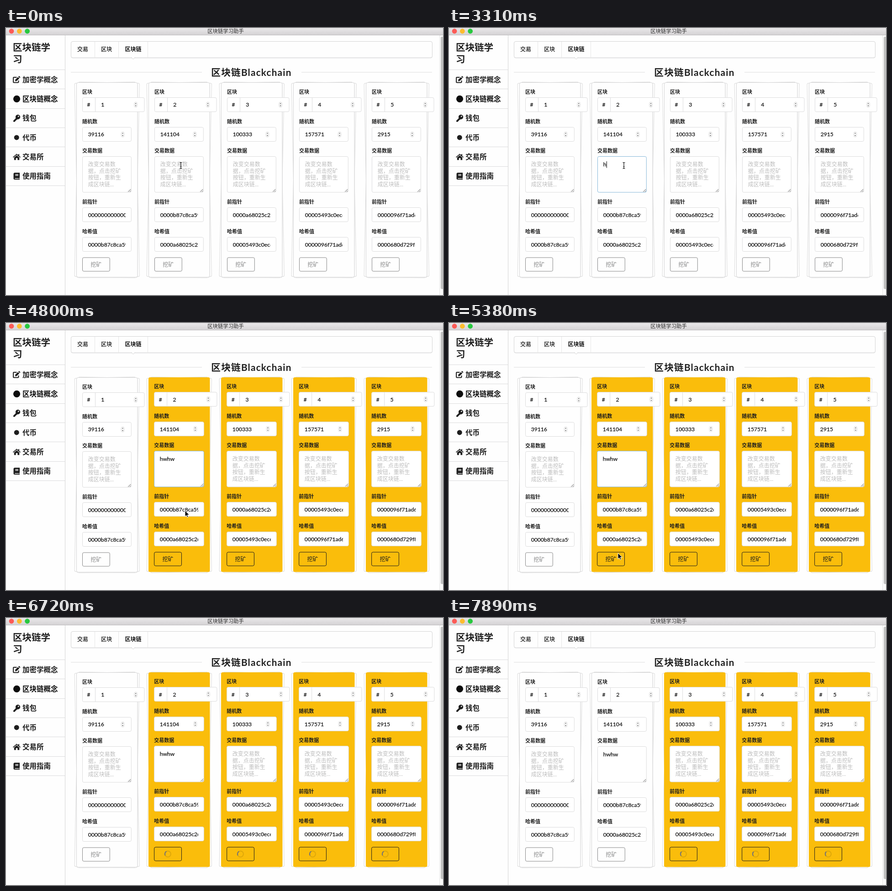
An HTML page for the animation above (8000 ms loop, 957 by 585 pixels).

```html
<!DOCTYPE html>
<html lang="zh-CN">
<head>
<meta charset="utf-8">
<title>区块链学习助手</title>
<style>
html, body { margin: 0; width: 100%; height: 100%; overflow: hidden; background: #fefefe; }
#stage { display: block; font-family: Lato, "Noto Sans CJK SC", "Noto Sans CJK", sans-serif; }
text { white-space: pre; }
</style>
</head>
<body>
<svg id="stage" width="957" height="585" viewBox="0 0 957 585">
  <defs>
    <linearGradient id="bar" x2="0" y2="1">
      <stop stop-color="#eae8ea"/><stop offset="1" stop-color="#d3d1d3"/>
    </linearGradient>
  </defs>
</svg>
<script>
const LOOP = 8000;
const INK = '#1e1e1e', LINE = '#dcdcdd', EDGE = '#d4d4d5', GOLD = '#fabd0b', FOCUS = '#85b7d9';
const HINT = '#bcbcbc', HINT_FOCUS = '#8c8c8c';
const stage = document.getElementById('stage');

function el(parent, tag, attrs) {
  const node = document.createElementNS('http://www.w3.org/2000/svg', tag);
  for (const k in attrs) node.setAttribute(k, attrs[k]);
  parent.appendChild(node);
  return node;
}
const rect = (p, x, y, width, height, attrs) => el(p, 'rect', { x, y, width, height, ...attrs });
const circle = (p, cx, cy, r, fill, more) => el(p, 'circle', { cx, cy, r, fill, ...more });
const path = (p, d, attrs) => el(p, 'path', { d, ...attrs });
const rule = (p, d, stroke = LINE) => path(p, d, { stroke, fill: 'none' });
// Text is placed by its vertical middle.
function label(p, x, mid, str, size, attrs) {
  const node = el(p, 'text', { x, y: mid + size * 0.37, 'font-size': size, fill: INK, ...attrs });
  node.textContent = str;
  return node;
}
const bold = { 'font-weight': 700 };
const medium = { fill: '#111', stroke: '#111', 'stroke-width': 0.25 };
const centred = { 'text-anchor': 'middle' };
const show = (node, on) => node.setAttribute('visibility', on ? 'inherit' : 'hidden');

function drawWindow() {
  rect(stage, 0, 0, 957, 585, { fill: '#fefefe' });
  // Page scrollbar
  rect(stage, 949, 16, 8, 569, { fill: '#fafafa' });
  rule(stage, 'M949.5 16V585', '#e6e6e6');
  rect(stage, 952, 19, 6, 553, { fill: '#c1c1c1', rx: 3 });
  rect(stage, 0, 0, 957, 16, { fill: 'url(#bar)' });
  rule(stage, 'M0 15.5H957', '#bdbbbd');
  ['#fc5b57', '#fdbc2e', '#28c83f'].forEach((c, i) => circle(stage, 12 + i * 17.3, 7, 5.4, c));
  label(stage, 481, 7.2, '区块链学习助手', 11.4, { ...centred, fill: '#2a2a2a' });
}

function drawSidebar() {
  rule(stage, 'M129.5 16V585', EDGE);
  label(stage, 15, 42.3, '区块链学', 20.5, bold);
  label(stage, 15, 68.3, '习', 20.5, bold);
  const items = ['加密学概念', '区块链概念', '钱包', '代币', '交易所', '使用指南'];
  for (let i = 0; i < 7; i++) rule(stage, `M0 ${Math.round(91 + i * 42.3) + 0.5}H129`);
  items.forEach((name, i) => {
    const mid = 113 + i * 42.3;
    const fill = i === 1 ? '#0d0d0d' : INK;
    label(stage, 36, mid, name, 15.5, { ...bold, fill });
    drawIcon(el(stage, 'g', { transform: `translate(15 ${mid - 8})`, fill }), i);
  });
}

function drawIcon(g, i) {
  if (i === 0) {
    path(g, 'M8.5 3H2.3Q1 3 1 4.3V13.2Q1 14.5 2.3 14.5H11.2Q12.5 14.5 12.5 13.2V10', { fill: 'none', stroke: INK, 'stroke-width': 2 });
    path(g, 'M5.3 8.3L11.2 2.4L14.2 5.4L8.3 11.3L5 11.6ZM12 1.6L13 .6Q13.6 0 14.3 .6L16 2.3Q16.6 3 16 3.6L15 4.6Z');
  } else if (i === 1) {
    circle(g, 8.5, 8, 7.6, '#0d0d0d');
  } else if (i === 2) {
    path(g, 'M8.5 6L1 13.5V16H5V14H7V12H8.5L11 9.5Z');
    circle(g, 11, 5.3, 5.2, INK);
    circle(g, 12.3, 4, 1.4, '#fefefe');
  } else if (i === 3) {
    circle(g, 8.2, 8, 5.5, INK);
  } else if (i === 4) {
    path(g, 'M0 8.6L8.5 1.4L12 4.3V2H14V6L17 8.6L16 9.8L8.5 3.6L1 9.8Z');
    path(g, 'M2.8 9.6L8.5 4.9L14.2 9.6V15H10.3V10.7H6.7V15H2.8Z');
  } else {
    path(g, 'M4.5 .5H15V11.8L14.3 12V14.2H15V15.7H4.2Q1.5 15.7 1.5 13V3.5Q1.5 .5 4.5 .5Z');
    path(g, 'M5.3 4.3H12M5.3 6.6H12M4.3 13.2H13.3', { stroke: '#fefefe', 'stroke-width': 1.2 });
  }
}

function drawTabs() {
  rect(stage, 142.5, 30, 791, 36, { rx: 3.5, fill: 'none', stroke: '#ececec' });
  rect(stage, 142.5, 29.5, 791, 35.5, { rx: 3.5, fill: '#fefefe', stroke: EDGE });
  rule(stage, 'M194.5 30V65M246.5 30V65M310.5 30V65', '#e6e6e6');
  label(stage, 168, 47, '交易', 12, { ...centred, ...medium });
  label(stage, 220, 47, '区块', 12, { ...centred, ...medium });
  label(stage, 278.5, 47, '区块链', 12, { ...centred, ...bold, fill: '#0d0d0d' });
  path(stage, 'M274.2 64L278.5 68.4L282.8 64', { fill: '#fefefe', stroke: EDGE });
  rule(stage, 'M142 97H429M647 97H933');
  label(stage, 449.3, 97, '区块链Blackchain', 20.7, { ...bold, 'letter-spacing': 1.2 });
}

const nonces = ['39116', '141104', '100333', '157571', '2915'];
const hashes = ['00000000000000', '0000b87c8ca592', '0000a68025c2e4', '00005493c0ec6b', '0000096f71ad6e', '0000680d729f8a'];
const hint = ['改变交易数', '据，点击挖矿', '按钮，重新生', '成区块链...'];

function box(p, x, y, w, h) {
  return rect(p, x + 0.5, y + 0.5, w - 1, h - 1, { rx: 3, fill: '#fff', stroke: LINE });
}
function stepper(p, x, y) {
  rect(p, x - 3.2, y - 5.7, 6.4, 11.4, { rx: 3.2, fill: '#fff', stroke: '#cfcfcf', 'stroke-width': 0.8 });
  path(p, `M${x - 1.7} ${y - 1.6}l1.7-2.4l1.7 2.4zM${x - 1.7} ${y + 1.6}l1.7 2.4l1.7-2.4z`, { fill: '#666' });
}
const value = (p, x, mid, str) => label(p, x, mid, str, 12.15, medium);
function clipped(p, x, y, w, str) {
  const view = el(p, 'svg', { x, y, width: w, height: 30, overflow: 'hidden' });
  value(view, 0, 15, str);
}

// One block in its valid (white) or stale (gold) look.
function drawCard(i, stale) {
  const g = el(stage, 'g', { transform: `translate(${Math.round(154 + i * 158.4)} 0)` });
  for (const a of [-1.2, 1.2]) {
    rect(g, 0.5, 119.5, 133.5, 426.5, { fill: '#fefefe', stroke: '#dcdcdc', rx: 3, transform: `rotate(${a} 67.2 332.7)` });
  }
  if (stale) {
    rect(g, 0, 119, 134.5, 426.5, { fill: GOLD, rx: 3.5 });
  } else {
    rect(g, 0.5, 120.5, 133.5, 426.5, { fill: 'none', stroke: '#e6e6e6', rx: 3.5 });
    rect(g, 0.5, 119.5, 133.5, 426.5, { fill: '#fefefe', stroke: EDGE, rx: 3.5 });
  }
  const f = el(g, 'g', { transform: stale ? 'translate(12.15 -.9)' : 'translate(13 0)' });
  const w = stale ? 109.6 : 107.8;
  const names = ['区块', '随机数', '交易数据', '前指针', '哈希值'];
  [140, 204.7, 269.3, 380.7, 445.7].forEach((y, k) => label(f, 0, y, names[k], 11, bold));

  box(f, 0, 152, w + 28.7, 32);
  rule(f, 'M28.5 153V183');
  label(f, 14, 168, '#', 12, { ...bold, ...centred });
  value(f, 41.3, 168, String(i + 1));
  stepper(f, w + 9.3, 168);

  box(f, 0, 217, w, 32);
  value(f, 12.7, 233, nonces[i]);
  stepper(f, w - 19.3, 233.2);

  const area = box(f, 0, 281, w, 79.5);
  path(f, `M${w - 7.5} 359l6-6M${w - 4} 359l2.5-2.5`, { stroke: '#555', 'stroke-width': 1 });
  const tip = el(f, 'g', { fill: HINT });
  hint.forEach((s, k) => label(tip, 12.7, 298.4 + k * 14.7, s, 12, { fill: 'inherit' }));

  box(f, 0, 393, w, 32);
  clipped(f, 12.7, 394.3, w - 25.6, hashes[i]);
  box(f, 0, 458, w, 32);
  clipped(f, 12.7, 459.3, w - 25.6, hashes[i + 1]);

  const button = el(f, 'g', { opacity: stale ? 1 : 0.52 });
  rect(button, 0.5, 503, 59.8, 30, { rx: 3, fill: 'none', stroke: '#1b1c1d' });
  const word = label(button, 30.3, 518.2, '挖矿', 12, { ...centred, fill: '#1b1c1d' });
  const card = { g, area, tip, button, word };
  if (stale) {
    card.loader = el(f, 'g');
    const ring = { 'stroke-width': 2.2 };
    circle(card.loader, 30.3, 518, 6.5, 'none', { ...ring, stroke: '#000', 'stroke-opacity': 0.1 });
    card.arc = path(card.loader, 'M25.7 513.4A6.5 6.5 0 0 1 34.9 513.4', { ...ring, fill: 'none', stroke: '#767676' });
  }
  if (i === 1) {
    card.typed = value(f, 12.7, 298.4, '');
    card.caret = rect(f, 13, 292, 1, 14.5, { fill: '#000' });
  }
  return card;
}

drawWindow();
drawSidebar();
drawTabs();
const cards = nonces.map((_, i) => [drawCard(i, false), drawCard(i, true)]);

const beam = path(stage, 'M-2.5-6.5Q0-6.5 0-5Q0-6.5 2.5-6.5M0-5V5.5M-2.5 7Q0 7 0 5.5Q0 7 2.5 7M-1.5 2.5H1.5',
  { fill: 'none', stroke: '#111', 'stroke-width': 1.2 });
const arrow = path(stage, 'M0 0V13.2L3 10.4L5 15L7.2 14L5.2 9.6H9.4Z',
  { fill: '#000', stroke: '#fff', 'stroke-width': 1, 'stroke-linejoin': 'round' });

// Each row: start time, then the value held until the next row.
const typing = [[0, ''], [3310, 'h'], [3600, 'hw'], [3750, 'hwh'], [4050, 'hwhw']];
const caretOn = [[0, 0], [150, 1], [630, 0], [1070, 1], [1520, 0], [2110, 1], [2560, 0], [3010, 1], [4500, 0]];
const pointer = [[0, 383, 301], [4500, 385, 318], [4650, 390, 364], [4800, 392, 411], [4950, 388, 446],
  [5090, 379, 482], [5240, 370, 504], [5390, 367, 511], [6270, 367, 520], [6420, 372, 545],
  [6570, 378, 572], [6720, 378, 620]];
const at = (rows, t) => rows.filter(r => r[0] <= t).pop();

const STALE = 3460, BLUR = 5530, MINE = 5680, MINED = 7745, TICK = 147.33;

function render(t) {
  const focused = t >= 150 && t < BLUR;
  const text = at(typing, t)[1];
  const mining = t >= MINE;
  const tick = Math.floor((t - MINE + 8) / TICK);
  const angle = 0.6 * (MINE + tick * TICK - 5633);

  cards.forEach(([fresh, old], i) => {
    const stale = i > 0 && t >= STALE && !(i === 1 && t >= MINED);
    show(fresh.g, !stale);
    show(old.g, stale);
    old.button.setAttribute('opacity', t < 3600 ? 0.78 : 1);
    show(old.word, !mining);
    show(old.loader, mining);
    old.arc.setAttribute('transform', `rotate(${angle} 30.3 518)`);
  });

  for (const c of cards[1]) {
    c.area.setAttribute('stroke', focused ? FOCUS : LINE);
    c.tip.setAttribute('fill', focused ? HINT_FOCUS : HINT);
    show(c.tip, !text);
    if (c.typed.textContent !== text) c.typed.textContent = text;
    c.caret.setAttribute('x', 13 + (text ? c.typed.getComputedTextLength() : 0));
    show(c.caret, at(caretOn, t)[1]);
  }

  const [, x, y] = at(pointer, t);
  const inText = y < 360;
  show(beam, inText);
  show(arrow, !inText);
  (inText ? beam : arrow).setAttribute('transform', `translate(${x} ${y})`);
}

const start = performance.now();
function loop() {
  render((performance.now() - start) % LOOP);
  requestAnimationFrame(loop);
}
loop();
</script>
</body>
</html>
```
